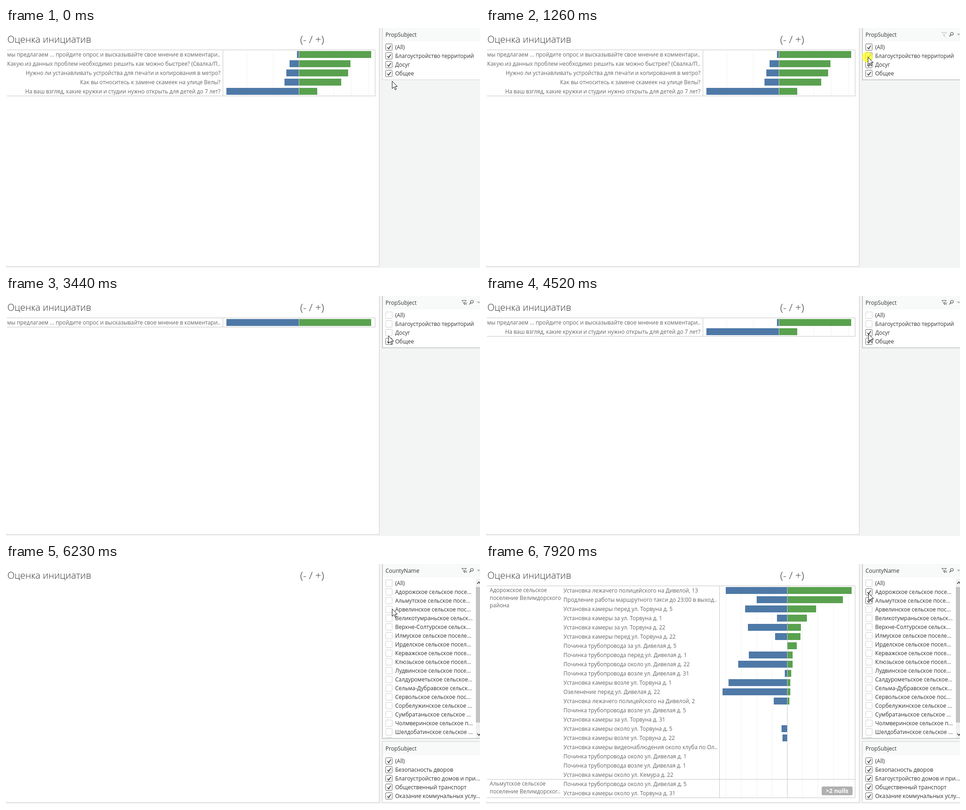
An HTML page for the animation above (8 s loop, 1028 px wide and 521 px high).

```html
<!DOCTYPE html>
<html lang="ru">
<head>
<meta charset="utf-8">
<style>
html, body { margin: 0; width: 100%; height: 100%; overflow: hidden; background: #f3f4f4; }
svg { display: block; width: 100%; height: 100%; font: 12px "Open Sans", "Noto Sans", sans-serif; }
.label { font-size: 11.88px; }
.title { font-weight: 300; }
</style>
</head>
<body>
<svg id="stage" viewBox="0 0 1028 521"></svg>
<script>
const stage = document.getElementById('stage');
const LOOP = 8000, COUNTY_AT = 5850;
const BLUE = '#4e79a7', GREEN = '#59a14f', LINE = '#c6c6c6', GRID = '#f1f1f1';

// Filter bits: 1 improvement, 2 leisure, 4 general, 8 and 16 counties
const polls = [
  ['мы предлагаем ... пройдите опрос и высказывайте свое мнение в комментари..', 4.35, 157, 4],
  ['Какую из данных проблем необходимо решить как можно быстрее? (Свалка/П..', 19.8, 112, 1],
  ['Нужно ли устанавливать устройства для печати и копирования в метро?', 26.7, 107, 1],
  ['Как вы относитесь к замене скамеек на улице Велы?', 31, 92, 1],
  ['На ваш взгляд, какие кружки и студии нужно открыть для детей до 7 лет?', 157, 40, 2]
];
const cam = (where, n) => `Установка камеры ${where} ул. Торвуна д. ${n}`;
const pipe = (where, n) => `Починка трубопровода ${where} ул. Дивелая д. ${n}`;
const firstCounty = [
  ['Установка лежачего полицейского на Дивелой, 13', 133, 140],
  ['Продление работы маршрутного такси до 23:00 в выход..', 66, 121],
  [cam('перед', 5), 91, 63],
  [cam('за', 1), 22, 43],
  [cam('за', 22), 85, 30],
  [cam('перед', 22), 26, 29],
  [pipe('за', 5), 0, 21],
  [pipe('перед', 1), 83, 12],
  [pipe('около', 22), 106, 12],
  [pipe('возле', 31), 5, 9],
  [cam('возле', 1), 127, 7],
  ['Озеленение перед ул. Дивелая д. 22', 140, 7],
  ['Установка лежачего полицейского на Дивелой, 2', 29, 5],
  [pipe('возле', 5), 0, 0],
  [cam('за', 31), 0, 0],
  [cam('около', 5), 12, 0],
  [cam('возле', 22), 10, 0],
  ['Установка камеры видеонаблюдения около клуба по Ол..', 0, 0],
  [pipe('около', 1), 0, 0],
  [pipe('возле', 1), 0, 0],
  ['Установка камеры около ул. Кемура д. 22', 0, 0]
];
const secondCounty = [[pipe('около', 5), 0, 0], [cam('около', 31), 0, 0]];
const counties = ('Адорожское Альмутское Арвелинское Великотумраньское Верхне-Солтурское ' +
  'Илмуское Ирделское Керважское Клюзьское Лудвинское Салдурометьское Сельма-Дубравское ' +
  'Сервольское Сорбелужинское Сумбратаньское Чолмверинское Шелдобатинское').split(' ')
  .map(name => (name + ' сельское поселение').slice(0, 24) + '...');

// Pointer: start, end, x, y
const moves = [
  [90, 240, 828, 63], [1500, 1570, 827, 82], [2050, 2120, 834, 79], [2600, 2600, 830, 77],
  [2830, 2900, 829, 62], [3290, 3440, 829, 86], [3520, 3600, 833, 93], [3670, 3750, 833, 81],
  [4520, 4520, 829, 82], [5070, 5140, 829, 61], [5690, 5690, 834, 89], [5770, 5850, 844, 111],
  [6150, 6370, 830, 82], [6760, 7070, 829, 63]
];
// Clicks: press, release, time of update, toggled bit
const clicks = [
  [550, 630, 630, 1], [1180, 1330, 1260, 1], [1740, 1890, 1970, 2], [2900, 3060, 2980, 1],
  [3830, 3980, 3900, 2], [4690, 4840, 4770, 2], [5350, 5460, 5410, 1],
  [6530, 6680, 6600, 8], [7760, 7920, 7840, 16]
];

const rect = (x, y, w, h, fill, more = '') =>
  `<rect x="${x}" y="${y}" width="${w}" height="${h}" fill="${fill}" ${more}/>`;
const path = (d, stroke, fill = 'none', more = '') =>
  `<path d="${d}" stroke="${stroke}" fill="${fill}" ${more}/>`;
const text = (x, y, s, fill = '#333', more = '') =>
  `<text x="${x}" y="${y}" fill="${fill}" ${more}>${s.replace('>', '&gt;')}</text>`;
const label = (x, y, s, more = '') => text(x, y, s, '#666', 'class="label" ' + more);

function pointer(t) {
  let x = 837, y = 115;
  for (const [a, b, tx, ty] of moves) {
    if (t < a) break;
    const n = Math.round((b - a) / 75);
    const k = n ? Math.min(n, Math.floor((t - a) * n / (b - a))) : 0;
    const p = (k + 1) / (n + 1);
    x += (tx - x) * p;
    y += (ty - y) * p;
  }
  return [Math.round(x), Math.round(y)];
}

const option = (y, s, on) =>
  rect(823.5, y - 6.5, 14, 14, '#fff', `rx="1" stroke="${on ? '#666' : '#cdcdcd'}"`) +
  (on ? path(`M827 ${y + 1}l3 3.2 4.5-7`, '#444', 'none', 'stroke-width="1.8"') : '') +
  text(844, y + 5, s);

function panel(y, bottom, name, options, hover) {
  const edge = hover ? '#a6a6a6' : '#d0d0d0';
  return rect(816, y, 212, bottom - y, '#fff') + rect(816, y, 212, 29, '#f8f9f9') +
    text(823, y + 19, name) +
    options.map(([s, on], i) => option(y + 41 + 19 * i, s, on)).join('') +
    rect(816, y, 1, bottom - y, edge) + rect(816, bottom, 212, 1, edge);
}

function icons(filtered) {
  const c = filtered ? '#555' : '#bdbdbd';
  return path('M988.5 9.5h10l-4 4.5v4.5l-2-1.5v-3z', c) +
    (filtered ? path('M995 14l5 5m0-5l-5 5', c) : '') +
    '<circle cx="1010.5" cy="12.5" r="3" fill="none" stroke="#555" stroke-width="1.2"/>' +
    path('M1008.3 15l-3.3 3.3', '#555', 'none', 'stroke-width="1.6"') +
    path('M1021 12h8l-4 4.5z', 'none', '#bbb');
}

const frame = (bottom, split) =>
  rect(2, 47, 799, 1, LINE) + rect(2, bottom, 799, 1, LINE) +
  rect(split, 47, 1, bottom - 47, LINE) + rect(800, 47, 1, bottom - 47, LINE);

const bars = (zero, i, neg, pos) =>
  rect(zero - neg, 50 + 20 * i, neg, 15, BLUE) + rect(zero, 50 + 20 * i, pos, 15, GREEN);

function pollChart(mask) {
  const rows = polls.filter(r => r[3] & mask);
  const max = Math.max(...rows.map(r => r[1])), k = 157 / max;
  const bottom = 47 + 20 * rows.length, step = (max > 31 ? 56.5 : 14.1) * k;
  let out = '';
  for (let x = 635 - step; x > 471; x -= step) out += rect(Math.round(x), 48, 1, bottom - 48, GRID);
  for (let x = 673; x < 800; x += 37.7) out += rect(Math.round(x), 48, 1, bottom - 48, GRID);
  rows.forEach(([s, neg, pos], i) => {
    out += label(465, 62 + 20 * i, s, 'text-anchor="end"') + bars(635, i, Math.round(neg * k), pos);
  });
  return out + rect(635, 48, 1, bottom - 48, '#c9d3cb') + frame(bottom, 470);
}

function countyChart(mask) {
  if (!(mask & 8)) return '';
  const both = mask & 16;
  const rows = both ? firstCounty.concat(secondCounty) : secondCounty;
  const bottom = 47 + 20 * rows.length, w = both ? 67 : 61;
  const place = (y, lines) => lines.map((s, i) => label(8, y + 16.5 * i, s)).join('');
  let out = '';
  for (let i = 1; i < 5; i++) {
    if (both) out += rect(Math.round(653 - 33.2 * i), 48, 1, bottom - 48, GRID);
    out += rect(Math.round(653 + 33.2 * i), 48, 1, bottom - 48, GRID);
  }
  rows.forEach(([s, neg, pos], i) => {
    out += label(168, 62 + 20 * i, s) + bars(653, i, neg, pos);
  });
  if (both) {
    out += place(61, ['Адорожское сельское', 'поселение Велимдорского', 'района']) +
      rect(2, 467, 799, 1, LINE);
  } else {
    out += path('M580.5 48V87', '#bbb', 'none', 'stroke-dasharray="2 1"') +
      rect(580, 50, 1, 15, BLUE) + rect(653, 50, 140, 15, GREEN);
  }
  return out + place(both ? 481 : 61, ['Альмутское сельское', 'поселение Велимдорског..']) +
    rect(653, 48, 1, bottom - 48, LINE) + frame(bottom, 506) +
    rect(795 - w, bottom - 24, w, 19, '#b0b0b0', 'rx="3"') +
    text(795 - w / 2, bottom - 10, both ? '>2 nulls' : '>1 null', '#fff',
      'font-size="12.8" font-weight="700" text-anchor="middle"');
}

function pollPanel(mask, hover) {
  return panel(0, 112, 'PropSubject', [
    ['(All)', mask === 7], ['Благоустройство территорий', mask & 1],
    ['Досуг', mask & 2], ['Общее', mask & 4]
  ], hover) + (hover ? icons(mask !== 7) : '');
}

function countyPanels(mask) {
  const list = [['(All)', 0], ...counties.map((s, i) => [s, mask & [16, 8][i]]), ['', 0]];
  return panel(0, 378, 'CountyName', list, true) + icons(true) +
    rect(1019, 32, 9, 346, '#f1f1f1') + rect(1019, 50, 9, 294, '#c4c4c4') +
    path('M1022 43l3.5-4 3.5 4M1022 368l3.5 4 3.5-4', '#444', 'none', 'stroke-width="1.8"') +
    rect(816, 379, 212, 7, '#f3f4f4') +
    panel(386, 517, 'PropSubject', ['(All)', 'Безопасность дворов', 'Благоустройство домов и при...',
      'Общественный транспорт', 'Оказание коммунальных услу...'].map(s => [s, 1]), false) +
    rect(816, 385, 212, 1, '#d0d0d0');
}

function draw(t) {
  let mask = 7;
  for (const c of clicks) if (t >= c[2]) mask ^= c[3];
  const [x, y] = pointer(t), county = t >= COUNTY_AT;
  return rect(0, 0, 1028, 521, '#f3f4f4') + rect(0, 0, 809, 517, '#fff') +
    rect(809, 0, 1, 518, '#ccc') + rect(0, 517, 810, 1, '#ccc') +
    text(3, 32, 'Оценка инициатив', '#333', 'class="title" font-size="20.4"') +
    text(638, 33, '(- / +)', '#333', 'class="title" font-size="22.6"') +
    (county ? countyChart(mask) + countyPanels(mask) : pollChart(mask) + pollPanel(mask, t >= 90)) +
    (clicks.some(c => t >= c[0] && t < c[1])
      ? `<circle cx="${x - 1}" cy="${y}" r="11.5" fill="#ffff20" opacity=".75"/>` : '') +
    path(`M${x + .5} ${y + .5}v16l3.8-3.6 2.8 6.2 2.4-1-2.7-6.1h5z`, '#111', '#fff');
}

const start = performance.now();
let shown = '';
function tick() {
  const next = draw((performance.now() - start) % LOOP);
  if (next !== shown) stage.innerHTML = shown = next;
  requestAnimationFrame(tick);
}
tick();
</script>
</body>
</html>
```
